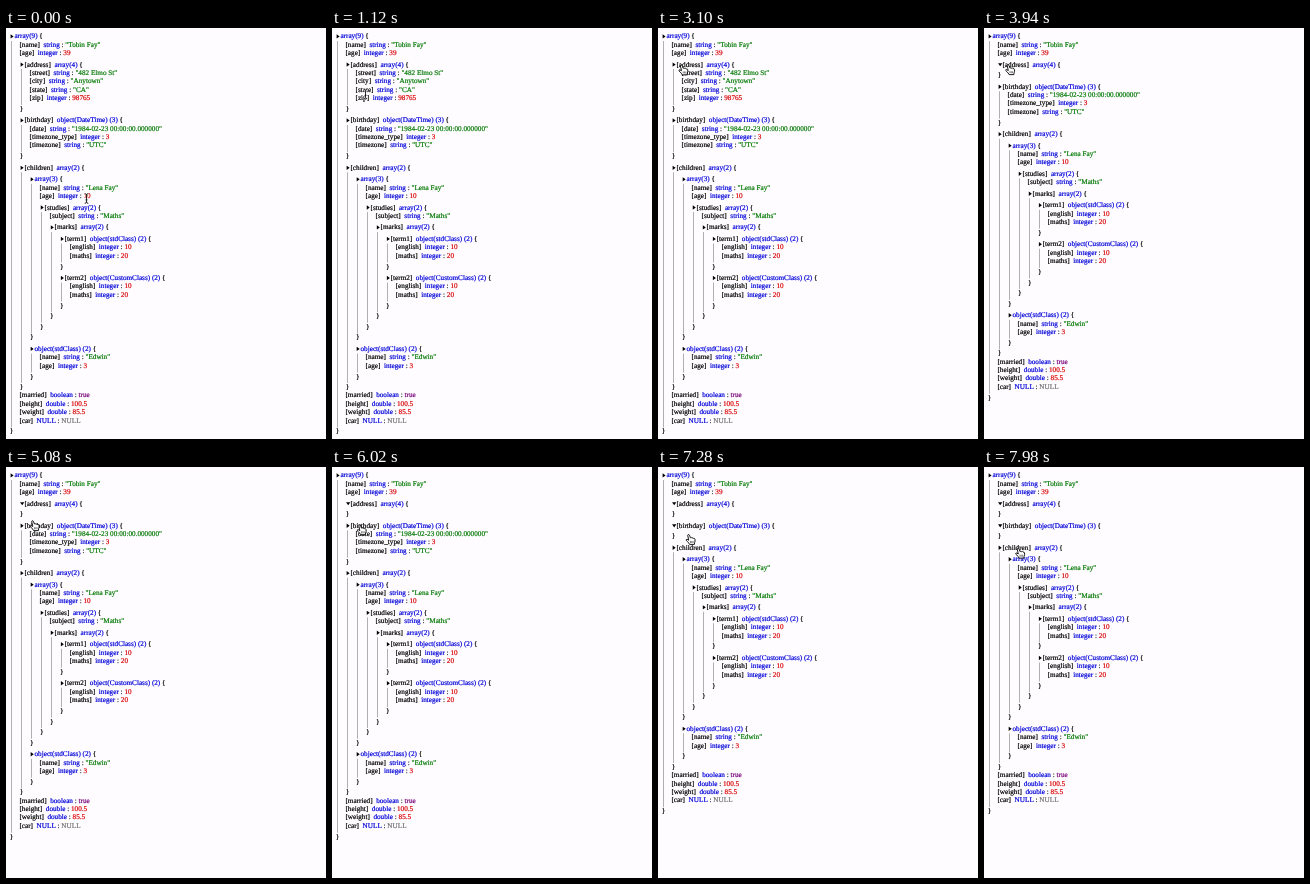
Write an HTML page with a canvas that moves like this. It is 320 px wide and 411 px high and loops after 8 s.

```html
<!DOCTYPE html>
<html lang="en">
<head>
<meta charset="utf-8">
<title>Collapsible dump</title>
<style>
  html, body { margin: 0; width: 100%; height: 100%; overflow: hidden; background: #fefcff; }
  canvas { display: block; width: 100%; height: 100%; }
</style>
</head>
<body>
<canvas id="stage"></canvas>
<script>
const W = 320, H = 411, LOOP = 8000;
const STEP = 10.05;
const GAP = { leaf: 8.35, block: 11.5, close: 10.9, nested: 10.6 };
const COLOR = { string: '#007800', integer: '#d80000', double: '#d80000', boolean: '#780078', NULL: '#707070' };
const BLUE = '#0000d8', BLACK = '#000', PAPER = '#fefcff';

const leaf = (key, type, value) => ({ key, type, value });
const block = (key, type, kids, closeAt = Infinity) => ({ key, type, kids, closeAt });
const scores = () => [leaf('english', 'integer', '10'), leaf('maths', 'integer', '20')];

const tree = block('', 'array(9)', [
  leaf('name', 'string', '"Tobin Fay"'),
  leaf('age', 'integer', '39'),
  block('address', 'array(4)', [
    leaf('street', 'string', '"482 Elmo St"'),
    leaf('city', 'string', '"Anytown"'),
    leaf('state', 'string', '"CA"'),
    leaf('zip', 'integer', '98765')
  ], 3940),
  block('birthday', 'object(DateTime) (3)', [
    leaf('date', 'string', '"1984-02-23 00:00:00.000000"'),
    leaf('timezone_type', 'integer', '3'),
    leaf('timezone', 'string', '"UTC"')
  ], 6300),
  block('children', 'array(2)', [
    block('', 'array(3)', [
      leaf('name', 'string', '"Lena Fay"'),
      leaf('age', 'integer', '10'),
      block('studies', 'array(2)', [
        leaf('subject', 'string', '"Maths"'),
        block('marks', 'array(2)', [
          block('term1', 'object(stdClass) (2)', scores()),
          block('term2', 'object(CustomClass) (2)', scores())
        ])
      ])
    ]),
    block('', 'object(stdClass) (2)', [
      leaf('name', 'string', '"Edwin"'),
      leaf('age', 'integer', '3')
    ])
  ]),
  leaf('married', 'boolean', 'true'),
  leaf('height', 'double', '100.5'),
  leaf('weight', 'double', '85.5'),
  leaf('car', 'NULL', 'NULL')
]);

// Pointer path: time, x, y of the hotspot
const path = [
  [0, 80.5, 170.5], [280, 79, 167], [450, 78, 164], [1120, 33.5, 66], [1300, 33, 64],
  [2000, 23, 43], [2420, 19, 39], [2840, 20, 38.5], [3200, 24.5, 37],
  [4300, 24.5, 37], [5080, 27, 54], [5900, 28, 58], [6620, 28.7, 59.5],
  [6900, 29, 60], [7800, 34.2, 80.5], [8000, 34.5, 81.5]
];

const canvas = document.getElementById('stage');
const ctx = canvas.getContext('2d');
let y = 0;

function resize() {
  const ratio = window.devicePixelRatio || 1;
  canvas.width = Math.round(innerWidth * ratio);
  canvas.height = Math.round(innerHeight * ratio);
}

function write(x, parts) {
  ctx.lineWidth = 0.2;
  for (const [text, color] of parts) {
    ctx.fillStyle = ctx.strokeStyle = color;
    ctx.fillText(text, x, y + 2);
    ctx.strokeText(text, x, y + 2);
    x += ctx.measureText(text).width;
  }
}

function shape(points, fill, line, width = 0.8) {
  ctx.beginPath();
  points.forEach(([px, py]) => ctx.lineTo(px, py));
  ctx.closePath();
  if (line) {
    ctx.strokeStyle = line;
    ctx.lineWidth = width;
    ctx.stroke();
  }
  ctx.fillStyle = fill;
  ctx.fill();
}

function drawToggle(x, open) {
  shape(open
    ? [[x, y - 2.2], [x + 3, y], [x, y + 2.2]]
    : [[x - 0.6, y - 1.4], [x + 3.7, y - 1.4], [x + 1.55, y + 1.7]], BLACK);
}

function drawLeaf(node, level) {
  write(3.4 + STEP * level, [
    [`[${node.key}]  `, BLACK], [node.type, BLUE],
    [' : ', BLACK], [node.value, COLOR[node.type]]
  ]);
}

function drawBlock(node, level, t) {
  const x = 4 + STEP * level, open = t < node.closeAt, top = y + 4.5;
  drawToggle(x + 0.6, open);
  write(x + 4.4, [[node.key && `[${node.key}]  `, BLACK], [node.type, BLUE], [' {', BLACK]]);
  if (open) {
    for (const kid of node.kids) {
      y += kid.kids ? GAP.block : GAP.leaf;
      kid.kids ? drawBlock(kid, level + 1, t) : drawLeaf(kid, level + 1);
    }
  }
  const last = node.kids[node.kids.length - 1];
  y += open && !last.kids ? GAP.close : GAP.nested;
  if (open) {
    ctx.fillStyle = '#a8a8a8';
    ctx.fillRect(Math.round(x + 1.2), top, 0.9, y - 4 - top);
  }
  write(x - 0.2, [['}', BLACK]]);
}

function pointerAt(t) {
  const i = Math.max(1, path.findIndex(p => p[0] > t));
  const [t0, x0, y0] = path[i - 1], [t1, x1, y1] = path[i];
  const k = (1 - Math.cos(Math.PI * (t - t0) / (t1 - t0))) / 2;
  return [x0 + (x1 - x0) * k, y0 + (y1 - y0) * k];
}

function drawBeam() {
  const line = new Path2D('M-1.8 -4.8Q0 -4.8 0 -3.6Q0 -4.8 1.8 -4.8M0 -3.6V3.6M-1.8 4.8Q0 4.8 0 3.6Q0 4.8 1.8 4.8M-1 1.4H1');
  for (const [color, width] of [['#fff', 1.8], ['#111', 0.9]]) {
    ctx.strokeStyle = color;
    ctx.lineWidth = width;
    ctx.stroke(line);
  }
}

function drawArrow() {
  shape([[0, 0], [0, 7.6], [1.7, 6], [2.9, 9], [4.3, 8.4], [3.1, 5.5], [5.4, 5.4]], '#000', '#fff', 1.2);
}

function drawHand() {
  const hand = new Path2D('M-1.3 .6Q-1.2 -.5 -.2 -.2Q.5 0 .7 .9L1.4 3Q2.6 2.4 3 3.2Q4.2 2.7 4.6 3.6Q5.7 3.3 6 4.4Q6.4 6.4 5.6 7.8L5.4 9.6H.6L-.4 8Q-1.7 6.4 -2.7 5.6Q-3.1 4.5 -1.9 4.5L-.2 5.5Z');
  ctx.fillStyle = '#fff';
  ctx.fill(hand);
  ctx.strokeStyle = '#000';
  ctx.lineWidth = 0.9;
  ctx.stroke(hand);
  ctx.lineWidth = 0.5;
  ctx.stroke(new Path2D('M1.5 6.2V8.2M2.8 6.2V8.2M4.1 6.2V8.2'));
}

function drawPointer(t) {
  ctx.save();
  ctx.translate(...pointerAt(t));
  if (t < 2000) drawBeam();
  else if (t < 2960) drawArrow();
  else drawHand();
  ctx.restore();
}

function draw(t) {
  // The tiny skew keeps small text from snapping to whole pixels
  ctx.setTransform(canvas.width / W, 1e-5, 1e-5, canvas.height / H, 0, 0);
  ctx.fillStyle = PAPER;
  ctx.fillRect(-1, -1, W + 2, H + 2);
  ctx.font = '7.2px "Liberation Serif", Times, serif';
  ctx.textRendering = 'geometricPrecision';
  ctx.lineJoin = 'round';
  y = 8.4;
  drawBlock(tree, 0, t);
  drawPointer(t);
}

addEventListener('resize', resize);
resize();
const start = performance.now();
function tick() {
  draw((performance.now() - start) % LOOP);
  requestAnimationFrame(tick);
}
tick();
</script>
</body>
</html>
```
